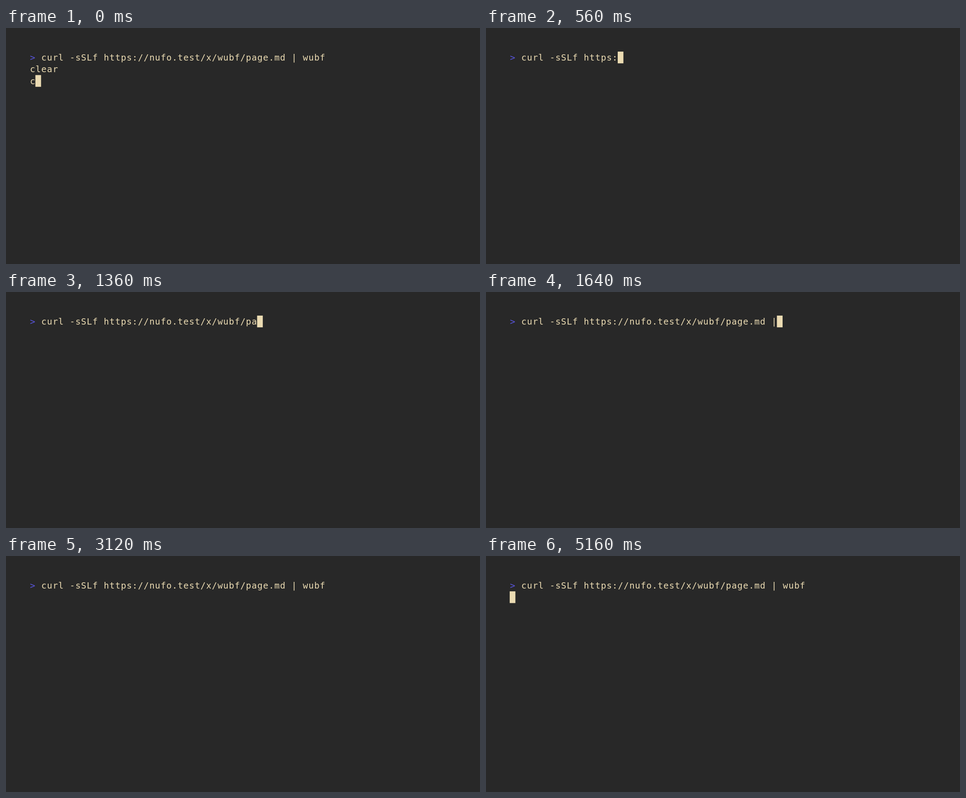
Recreate the animation shown at these times as an HTML page with a canvas. Size 1058 px wide and 529 px high, loop 5.28 s.

```html
<!DOCTYPE html>
<html lang="en">
<head>
<meta charset="utf-8">
<title>Terminal demo</title>
<style>
  html, body { margin: 0; height: 100%; overflow: hidden; background: #282828; }
  canvas { display: block; }
</style>
</head>
<body>
<canvas id="screen" width="1058" height="529"></canvas>
<script>
const ctx = document.getElementById('screen').getContext('2d');

const LOOP = 5280, TICK = 40;
const LEFT = 52.9, TOP = 52.9, CELL = 12.69, ROW = 26.3, BASELINE = 20.1;
const BACK = '#282828', TEXT = '#ebdbb2', DIM = '#8a826d', PROMPT = '#5a56e0';

const COMMAND = '> curl -sSLf https://nufo.test/x/wubf/page.md | wubf';
const STEP_1 = 'step 1 of 3 // say hello to the world';
const STEP_2 = 'step 2 of 3 // say hello to the world again';
const STEP_3 = 'step 3 of 3 // log a final message to standard error';
const HELLO = 'l Hello WUBF!';
const AGAIN = '-sHello (again) WUBF!';
const STDERR = 'heeeeey! this will be printed to stderr :)';

// Program output, mixed with the echo of keys typed while it runs.
const header = [COMMAND, 'clear'];
const first = [...header, STEP_1, ''];
const second = [...first, HELLO, '', STEP_2, ''];
const third = [...second, AGAIN, ''];
const done = [...third, STEP_3, '', STDERR];
const OUTPUT = [
  [...header, 'c'],
  [...header, 'cu'],
  [...header, 'cur'],
  [...first, 'l'],
  [...first, 'l '],
  [...second, '-'],
  [...second, '-s'],
  [...third, 'SL'],
  [...done, 'f '],
  [...done, 'f h'],
];
const CLEARED = OUTPUT.length * TICK;

// [time, characters on the prompt line]
const TYPING = [[400, 15], [560, 19], [1120, 34], [1160, 34], [1360, 40], [1720, 49], [1840, 52]];
const ENTER = 1880;
const BLINKS = [2320, 2680, 3120, 3520, 3920, 4320, 4760, 5160];

function typedLength(time) {
  const next = TYPING.findIndex(([t]) => t > time);
  if (next < 0) return COMMAND.length;
  const [t0, n0] = TYPING[next - 1], [t1, n1] = TYPING[next];
  return Math.floor(n0 + (n1 - n0) * (time - t0) / (t1 - t0) + 1e-6);
}

function linesAt(time) {
  if (time < CLEARED) return OUTPUT[time / TICK];
  if (time < ENTER) return [COMMAND.slice(0, typedLength(time))];
  return [COMMAND, ''];
}

function drawLine(line, row) {
  const color = line.startsWith('step') ? DIM : TEXT;
  [...line].forEach((char, col) => {
    ctx.fillStyle = char === '>' ? PROMPT : color;
    ctx.fillText(char, LEFT + col * CELL + 0.5, TOP + row * ROW + BASELINE);
  });
}

function drawCursor(col, row) {
  ctx.fillStyle = TEXT;
  ctx.fillRect(LEFT + col * CELL, TOP + row * ROW, CELL, ROW);
}

function draw(now) {
  const time = Math.floor(now % LOOP / TICK) * TICK;
  const lines = linesAt(time);
  const last = lines.length - 1;
  ctx.fillStyle = BACK;
  ctx.fillRect(0, 0, 1058, 529);
  ctx.font = '19.4px "DejaVu Sans Mono", monospace';
  lines.forEach(drawLine);
  const cursorOn = BLINKS.filter(t => t <= time).length % 2 === 0;
  if (cursorOn) drawCursor(lines[last].length, last);
}

let start;
function frame(now) {
  start ??= now;
  draw(now - start);
  requestAnimationFrame(frame);
}
draw(0);
requestAnimationFrame(frame);
</script>
</body>
</html>
```
